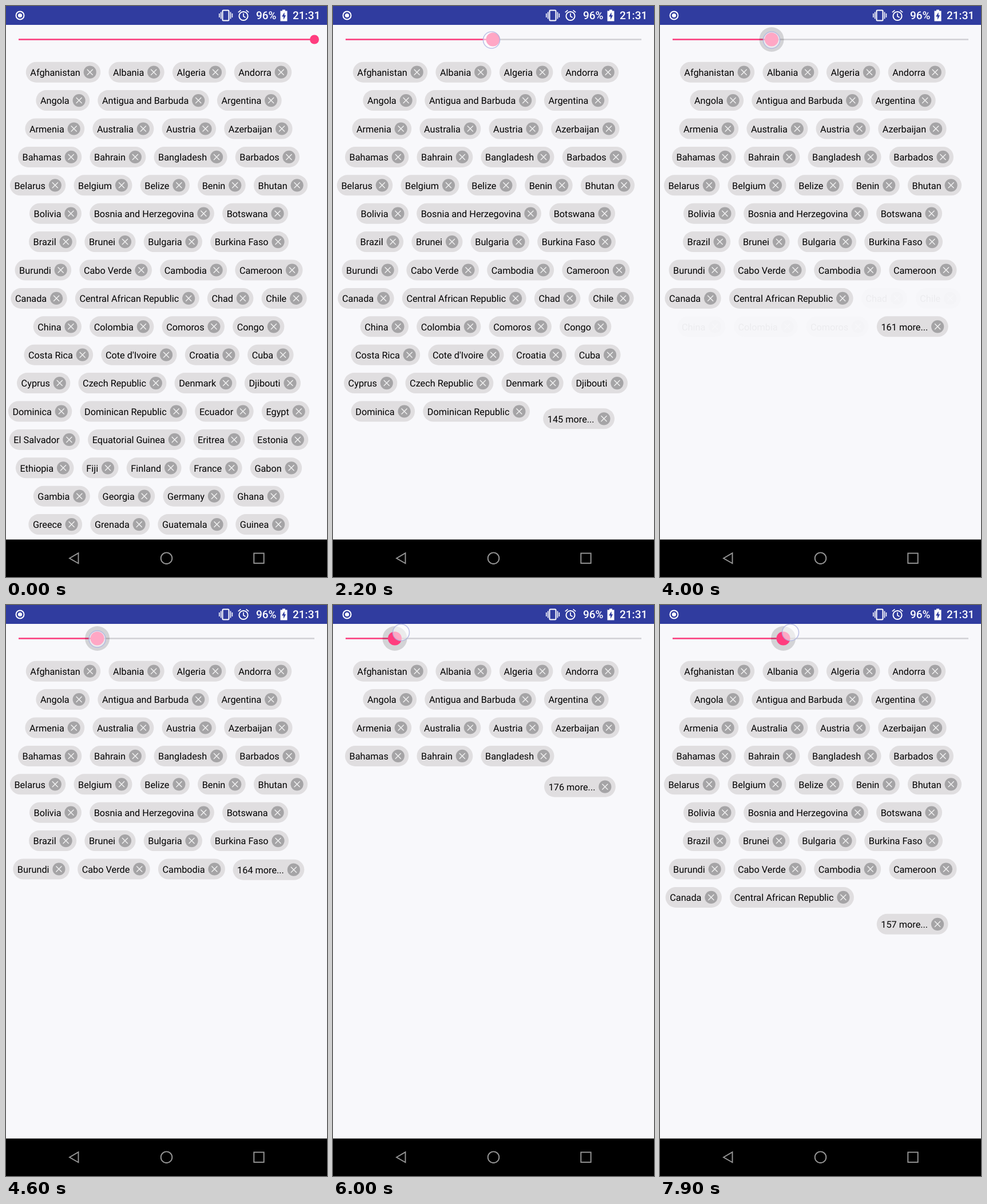
These frames come from a looping animation (561 by 998 pixels, 8 s). An HTML page:

```html
<!DOCTYPE html>
<html lang="en">
<head>
<meta charset="utf-8">
<title>Chip list with limit slider</title>
<style>
html, body { margin: 0; width: 100%; height: 100%; overflow: hidden; background: #f8f8fb; }
svg { display: block; width: 100%; height: 100%; font-family: Roboto, "Open Sans", sans-serif; text-rendering: geometricPrecision; }
#chips text { font-size: 16.25px; }
.line { fill: none; stroke: #fff; stroke-width: 2; }
.status { font-size: 19px; font-weight: 500; fill: #fff; }
</style>
</head>
<body>
<svg viewBox="0 0 561 998">
  <rect width="561" height="998" fill="#f8f8fb"/>
  <g id="chips"></g>

  <path d="M22 58.5H539" stroke="#d1d0d4" stroke-width="2.6"/>
  <path id="bar" stroke="#ff3d7f" stroke-width="2.6"/>
  <circle id="halo" cy="58.5" r="21.5" opacity=".15"/>
  <circle id="thumb" cy="58.5" fill="#ff3d7f"/>

  <rect width="561" height="33" fill="#303c9f"/>
  <circle class="line" cx="24.5" cy="16.5" r="7"/>
  <circle cx="24.5" cy="16.5" r="3.6" fill="#fff"/>
  <rect class="line" x="378.5" y="7.5" width="11" height="18" rx="1.5"/>
  <path class="line" d="M375.7 10.5V22.5M392.5 10.5V22.5M372.8 13V20M395.4 13V20" style="stroke-width:1.6"/>
  <circle class="line" cx="415" cy="17.5" r="7.6"/>
  <path class="line" d="M415 12.8V18L418.6 20.3M405.8 11.2L410.4 7.3M424.2 11.2L419.6 7.3" style="stroke-width:1.7"/>
  <text class="status" x="437" y="23.3">96%</text>
  <path d="M483 6.5H488V8.5H491.5V26.5H479.5V8.5H483Z" fill="#fff"/>
  <path d="M486.6 11L482 18.5H485V24L489.2 16.3H486.6Z" fill="#303c9f"/>
  <text class="status" x="501" y="23.3">21:31</text>

  <circle id="finger" r="14.5" fill="#fff" fill-opacity=".55" stroke="#a9afe0" stroke-opacity=".75" stroke-width="1.6"/>

  <rect y="932.5" width="561" height="66"/>
  <g fill="none" stroke="#989898" stroke-width="1.9">
    <path d="M111 965.2L126.5 956.2V974.2Z"/>
    <circle cx="280.5" cy="965.2" r="9.8"/>
    <rect x="433.3" y="956.5" width="17.4" height="17.4"/>
  </g>
</svg>
<script>
const names = `Afghanistan,Albania,Algeria,Andorra,Angola,Antigua and Barbuda,Argentina,Armenia,Australia,Austria,Azerbaijan,Bahamas,Bahrain,Bangladesh,Barbados,Belarus,Belgium,Belize,Benin,Bhutan,Bolivia,Bosnia and Herzegovina,Botswana,Brazil,Brunei,Bulgaria,Burkina Faso,Burundi,Cabo Verde,Cambodia,Cameroon,Canada,Central African Republic,Chad,Chile,China,Colombia,Comoros,Congo,Costa Rica,Cote d'Ivoire,Croatia,Cuba,Cyprus,Czech Republic,Denmark,Djibouti,Dominica,Dominican Republic,Ecuador,Egypt,El Salvador,Equatorial Guinea,Eritrea,Estonia,Ethiopia,Fiji,Finland,France,Gabon,Gambia,Georgia,Germany,Ghana,Greece,Grenada,Guatemala,Guinea`.split(",");

const LOOP = 8000, STEP = 100, PRESS = 800;
const CENTER = 267, MAX_ROW = 535, GAP = 14.2, TOP = 115.7, PITCH = 49.4;
const FADE = 120, MOVE = 250;

const $ = id => document.getElementById(id);
const clamp = v => Math.max(0, Math.min(1, v));
const lerp = (a, b, p) => a + (b - a) * p;
const ease = p => (1 - Math.cos(Math.PI * p)) / 2;

function makeChip(label) {
  const el = document.createElementNS("http://www.w3.org/2000/svg", "g");
  el.innerHTML = `<rect y="-18" height="36" rx="18" fill="#e0dee0"/><text x="7.6" y="6.2">${label}</text>
    <g><circle r="11.1" fill="#a5a4a6"/><path d="M-5-5L5 5M5-5L-5 5" stroke="#f2f2f2" stroke-width="1.4"/></g>`;
  $("chips").append(el);
  const [box, text, icon] = el.children;
  const w = text.getComputedTextLength() + 43;
  box.setAttribute("width", w);
  icon.setAttribute("transform", `translate(${w - 18.5})`);
  return { el, text, w };
}

const chips = names.map(makeChip);
const more = makeChip("100 more...");

// Centred rows holding the first n chips and the "more" chip.
function layout(n) {
  const rows = [];
  let width = Infinity;
  for (const { w } of [...chips.slice(0, n), more]) {
    if (width + GAP + w > MAX_ROW) {
      rows.push([]);
      width = -GAP;
    }
    rows.at(-1).push(w);
    width += GAP + w;
  }
  return rows.flatMap((ws, r) => {
    const total = ws.reduce((a, b) => a + b) + GAP * (ws.length - 1);
    let x = CENTER - total / 2 - GAP;
    return ws.map((w, i) => [x += GAP + (i && ws[i - 1]), TOP + PITCH * r]);
  });
}

// Each run of updates: start, interval, chip counts, optional chips kept while moving.
const runs = [
  [0, 1000, [68, 53]],
  [1915, 394, [49, 46, 42, 41, 38]],
  [3885, 370, [33, 30, 26, 22]],
  [5678, 0, [18], 14],
  [6206, 370, [22, 26, 30, 33, 38]]
];
const states = runs.flatMap(([t, gap, counts, keep]) =>
  counts.map((n, i) => ({ t: t + gap * i, n, keep, pos: layout(n) })));
states.forEach((s, i) => {
  const prev = states[i - 1] || s;
  s.prev = prev;
  s.keep ??= Math.min(prev.n, s.n);
  s.label = `${(s.n > prev.n ? 195 : 194) - s.n} more...`;
});

// Drag path: time, thumb x, finger x.
const drag = [[800, 539, 541], [1400, 296, 296], [1900, 296, 296], [2200, 279.5, 277], [4000, 195, 195],
  [5100, 130, 130], [5700, 94, 96], [6000, 108, 119], [7000, 172.5, 170.5], [7900, 215.5, 228]];

function dragAt(t) {
  const i = Math.max(1, drag.findIndex(k => k[0] >= t));
  const a = drag[i - 1], b = drag[i];
  const p = clamp((t - a[0]) / (b[0] - a[0]));
  return [lerp(a[1], b[1], p), lerp(a[2], b[2], p)];
}

function place(chip, [x, y], opacity) {
  chip.el.setAttribute("transform", `translate(${x} ${y})`);
  chip.el.setAttribute("opacity", opacity);
}

// Removed chips fade, the rest move, then new chips fade in.
function drawChips(t) {
  const s = states.findLast(s => s.t <= t), { prev, keep } = s;
  const dt = t - s.t, wait = prev.n > keep ? FADE : 0;
  const p = ease(clamp((dt - wait) / MOVE));
  const between = (u, v) => [lerp(u[0], v[0], p), lerp(u[1], v[1], p)];
  chips.forEach((chip, i) => {
    const leaving = dt < wait, { n, pos } = leaving ? prev : s;
    if (i < keep) place(chip, between(prev.pos[i], s.pos[i]), 1);
    else if (i >= n) place(chip, [0, 0], 0);
    else place(chip, pos[i], leaving ? 1 - dt / wait : clamp((dt - wait - MOVE) / FADE));
  });
  more.text.textContent = s.label;
  place(more, between(prev.pos[prev.n], s.pos[s.n]), 1);
}

function drawSlider(t) {
  const [x, fx] = dragAt(t), pressed = t >= PRESS;
  const fy = lerp(59.5, 48, clamp((t - 5100) / 900));
  $("bar").setAttribute("d", `M22 58.5H${x}`);
  $("thumb").setAttribute("cx", x);
  $("thumb").setAttribute("r", pressed ? 12 : 8);
  $("halo").setAttribute("cx", x);
  $("halo").style.display = pressed && (t < 1400 || t > 2200) ? "" : "none";
  $("finger").style.display = pressed ? "" : "none";
  $("finger").setAttribute("transform", `translate(${fx} ${fy})`);
}

const start = performance.now();
function frame() {
  const t = Math.floor((performance.now() - start) % LOOP / STEP) * STEP;
  drawChips(t);
  drawSlider(t);
  requestAnimationFrame(frame);
}
frame();
</script>
</body>
</html>
```
